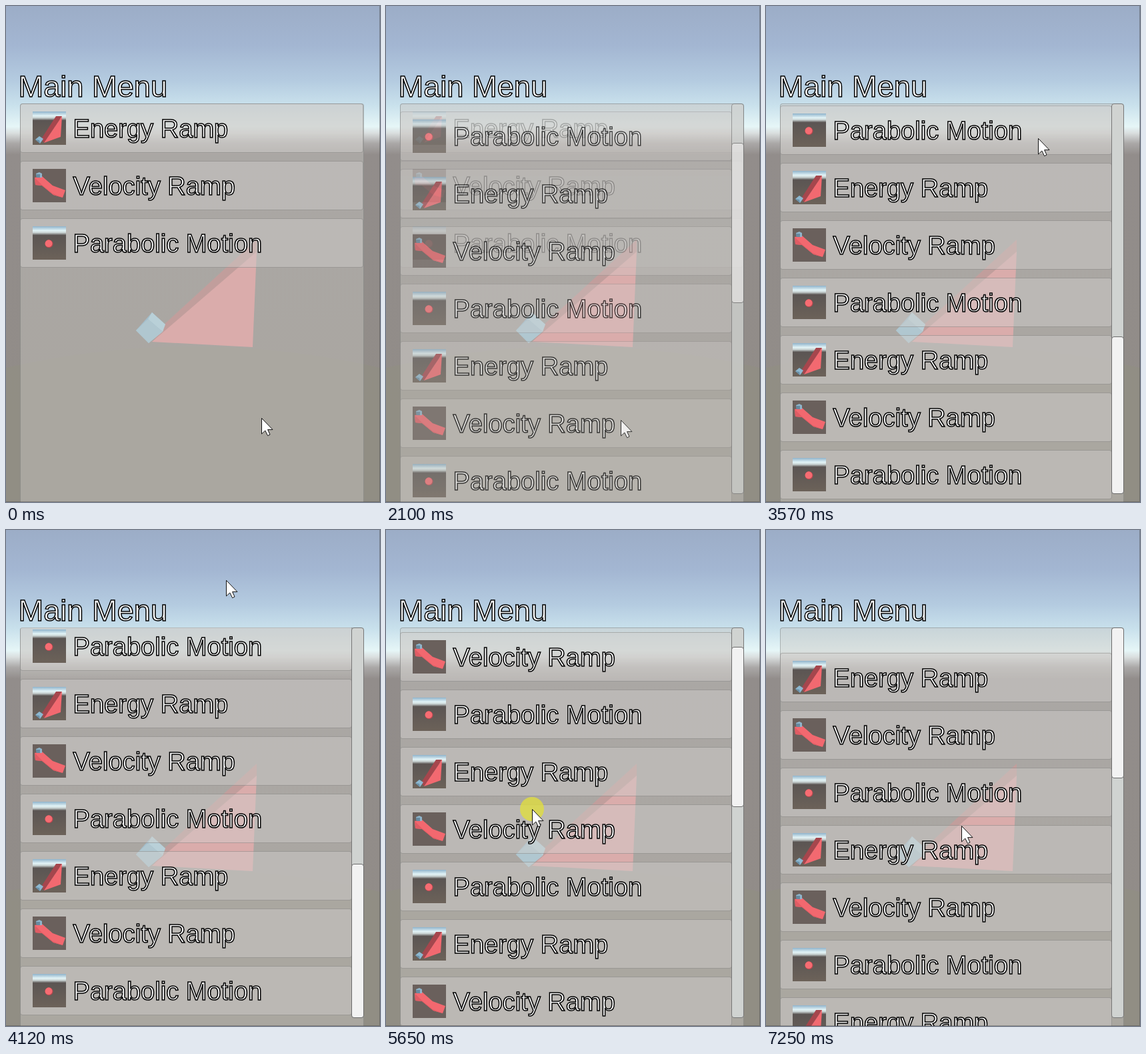
An HTML page for the animation above (7320 ms loop, 561x743 px).

```html
<!DOCTYPE html>
<html lang="en">
<head>
<meta charset="utf-8">
<title>Main Menu</title>
<style>
html, body { margin: 0; width: 100%; height: 100%; overflow: hidden; }
#stage { position: relative; width: 561px; height: 743px; overflow: hidden;
  font-family: "Liberation Sans", Arial, sans-serif; color: #fff; white-space: nowrap; }
#stage > *, .list, .row, .row > *, #bar, #handle { position: absolute; box-sizing: border-box; }
#scene { left: 0; top: 0; }
h1, .row span { margin: 0; font-weight: 400; -webkit-text-stroke: 1.5px #000; }
h1 { left: 18.5px; top: 95px; font-size: 45.2px; line-height: 52px; }
#panel { left: 21px; top: 146px; width: 516px; height: 604px; overflow: hidden; border-radius: 4px;
  background: rgba(200, 197, 192, .45); box-shadow: inset 0 0 0 1px rgba(90, 95, 95, .35); }
.list { left: 0; top: 0; width: 100%; height: 100%; }
.row { left: 0; width: 515px; height: 74px; border-radius: 4px;
  background: rgba(208, 206, 204, .45); border: 1px solid rgba(70, 70, 70, .28); }
#long .row { width: 498px; }
.row svg { left: 18px; top: 11px; }
.row span { left: 78.5px; top: 15px; font-size: 38.1px; line-height: 44px; }
#bar { left: 497px; top: 0; width: 19px; height: 585px; border-radius: 4px;
  background: #d0d3d1; border: 1px solid #777; }
#handle { left: -1px; top: -1px; width: 19px; border-radius: 4px;
  background: #f2f2f2; border: 1px solid #6c6c6c; }
#press { width: 36px; height: 36px; margin: -18px; border-radius: 50%; background: rgba(224, 222, 64, .8); }
#cursor, #press { left: 0; top: 0; }
#edge { inset: 0; border: solid rgba(60, 60, 60, .4); border-width: 0 1px 1px 0; }
</style>
</head>
<body>
<div id="stage">
  <svg id="scene" width="561" height="743">
    <defs>
      <linearGradient id="sky" x2="0" y2="743" gradientUnits="userSpaceOnUse">
        <stop offset="0" stop-color="#9cadc7"/>
        <stop offset=".08" stop-color="#a3b6d2"/>
        <stop offset=".15" stop-color="#b4cbe0"/>
        <stop offset=".2" stop-color="#c9e1ec"/>
        <stop offset=".243" stop-color="#e6f6f7"/>
        <stop offset=".256" stop-color="#dadfdf"/>
        <stop offset=".277" stop-color="#aaa8a7"/>
        <stop offset=".3" stop-color="#928d8b"/>
        <stop offset="1" stop-color="#918c87"/>
      </linearGradient>
      <linearGradient id="mini" x2="0" y2="1">
        <stop offset="0" stop-color="#8fb3cb"/>
        <stop offset=".13" stop-color="#e2f3f6"/>
        <stop offset=".19" stop-color="#c9d3d3"/>
        <stop offset=".27" stop-color="#5b5553"/>
        <stop offset="1" stop-color="#6c6259"/>
      </linearGradient>
      <symbol id="energy" viewBox="0 0 50 50">
        <path fill="url(#mini)" d="M0 0h50v50H0z"/>
        <path fill="#a5464d" d="M35 7h9L17 47l-4-6z"/>
        <path fill="#f26970" d="M44 7l-2 31-25 9z"/>
        <path fill="#8db8d0" d="M4 42l6-5 6 4-5 7z"/>
        <path fill="#6a90a8" d="M4 42l6 1 1 5z"/>
      </symbol>
      <symbol id="velocity" viewBox="0 0 50 50">
        <path fill="#6a605c" d="M0 0h50v50H0z"/>
        <path fill="#f2686f" d="M3 13l11-2 16 14 19 7-4 11-14-4-17-14-10-1z"/>
        <path fill="#e05c64" d="M4 24l-1-11 11 11 16 13 15 6-14-4-17-14z"/>
        <path fill="#8fb4ca" d="M5 7l5-2 4 2v6H6z"/>
        <path fill="#6689a0" d="M5 8h6v5H6z"/>
      </symbol>
      <symbol id="parabolic" viewBox="0 0 50 50">
        <path fill="url(#mini)" d="M0 0h50v50H0z"/>
        <circle cx="24.5" cy="26.3" r="6" fill="#b9484f"/>
        <circle cx="24" cy="25.7" r="5.4" fill="#f66c72"/>
      </symbol>
    </defs>
    <path fill="url(#sky)" d="M0 0h561v743H0z"/>
    <path fill="#928f84" opacity=".7" d="M0 542Q280 478 561 542V743H0z"/>
    <path fill="#bb7d7e" d="M376 350V372L220 504 236 478z"/>
    <path fill="#e99798" d="M376 368L370 511 219 503z"/>
    <path fill="#86b8d4" d="M195 486L219 459 239 477 214 505z"/>
    <path fill="#acd8ea" d="M219 459L239 477 235 488 213 469z"/>
    <path fill="#9cc8dc" d="M195 486L213 469 235 488 214 505z"/>
  </svg>
  <h1>Main Menu</h1>
  <div id="panel">
    <div class="list" id="short"></div>
    <div class="list" id="long"></div>
  </div>
  <div id="press"></div>
  <svg id="cursor" width="22" height="32" viewBox="-1 -1 22 32" style="margin:-1px">
    <path d="M.5 .5V24L5.8 19 9.6 26.7 13 25 9.6 17.6H17Z" fill="#fff" stroke="#111"/>
  </svg>
  <div id="edge"></div>
</div>
<script>
const LOOP = 7320, PITCH = 86, CONTENT = 1535, MAX_SCROLL = 932;
const TRACK = 585, KNOB = 18, FULL = 240;
const DRAG = 220;          // length of every drag, ms
const TAU = 115;           // decay of coasting and of the bounce, ms
const PULL = .72;          // share of a drag that shows past an end
const $ = id => document.getElementById(id);
const clamp = (v, lo, hi) => Math.min(hi, Math.max(lo, v));

// Each drag: the time it starts, and where the pointer goes.
const drag = (at, x, from, to) => ({ at, x, from, to });
const shortDrags = [drag(100, 383, 617, 300), drag(900, 365, 400, 690)];
const longDrags = [
  drag(2105, 352, 620, 177), drag(3080, 428, 451, 190), drag(3720, 330, 228, 75),
  drag(4500, 300, 170, 640), drag(5000, 270, 190, 500), drag(5613, 219, 498, 32),
  drag(6135, 323, 590, 66), drag(6560, 310, 120, 650), drag(6980, 293, 152, 443)
];
const drags = [...shortDrags, ...longDrags];

// The list follows the pointer, stretches past its ends, then coasts or springs back.
function scrollAt(t, list, max, scroll) {
  list.forEach(({ at, from, to }, i) => {
    if (t < at) return;
    const path = from - to, until = Math.min(t, list[i + 1]?.at ?? LOOP) - at - DRAG;
    const raw = scroll + path * Math.min(1, (t - at) / DRAG);
    const inside = clamp(raw, 0, max);
    scroll = inside + (raw - inside) * PULL;
    if (until > 0) {
      const rest = clamp(raw + path * TAU / DRAG, 0, max);
      scroll = rest + (scroll - rest) * Math.exp(-until / TAU);
    }
  });
  return scroll;
}

// Between drags the pointer waits for half the gap, then moves to the next start.
function pointerAt(t) {
  const i = drags.findLastIndex(d => d.at <= t);
  if (i < 0) return { x: drags[0].x, y: drags[0].from, down: false };
  const { at, x, from, to } = drags[i], next = drags[i + 1], end = at + DRAG;
  if (t < end) return { x, y: from + (to - from) * (t - at) / DRAG, down: true };
  if (!next) return { x, y: to, down: false };
  const k = clamp(2 * (t - end) / (next.at - end) - 1, 0, 1), ease = k * k * (3 - 2 * k);
  return { x: x + (next.x - x) * ease, y: to + (next.from - to) * ease, down: false };
}

function fill(list, count) {
  const names = ["Energy Ramp", "Velocity Ramp", "Parabolic Motion"];
  const rows = Array.from({ length: count }, (_, i) => {
    const name = names[i % 3], icon = name.split(" ")[0].toLowerCase();
    return `<div class="row" style="top:${i * PITCH}px">
      <svg width="50" height="50"><use href="#${icon}"/></svg><span>${name}</span></div>`;
  });
  list.innerHTML = `<div class="list">${rows.join("")}</div>`;
}
fill($("short"), 3);
fill($("long"), 18);
$("long").insertAdjacentHTML("beforeend", '<div id="bar"><div id="handle"></div></div>');

const move = (el, x, y) => { el.style.transform = `translate(${Math.round(x)}px, ${Math.round(y)}px)`; };

function draw(t) {
  const scroll = scrollAt(t, longDrags, MAX_SCROLL, 160);
  const mix = clamp((t - 1900) / 300, 0, 1);
  move($("short").firstChild, 0, -scrollAt(t, shortDrags, 0, 0));
  move($("long").firstChild, 0, -scroll);
  $("short").style.opacity = 1 - mix;
  $("long").style.opacity = mix;

  // The handle shrinks while the list is pulled past an end.
  const inside = clamp(scroll, 0, MAX_SCROLL);
  const size = FULL - Math.abs(scroll - inside) * (TRACK - KNOB) / CONTENT;
  $("handle").style.height = Math.round(size) + "px";
  move($("handle"), 0, inside / MAX_SCROLL * (TRACK - size));

  const { x, y, down } = pointerAt(t);
  move($("cursor"), x, y);
  move($("press"), x, y);
  $("cursor").style.opacity = 1 - mix * (1 - mix);
  $("press").style.visibility = down ? "visible" : "hidden";
}

const start = performance.now();
function tick() {
  draw((performance.now() - start) % LOOP);
  requestAnimationFrame(tick);
}
tick();
</script>
</body>
</html>
```
